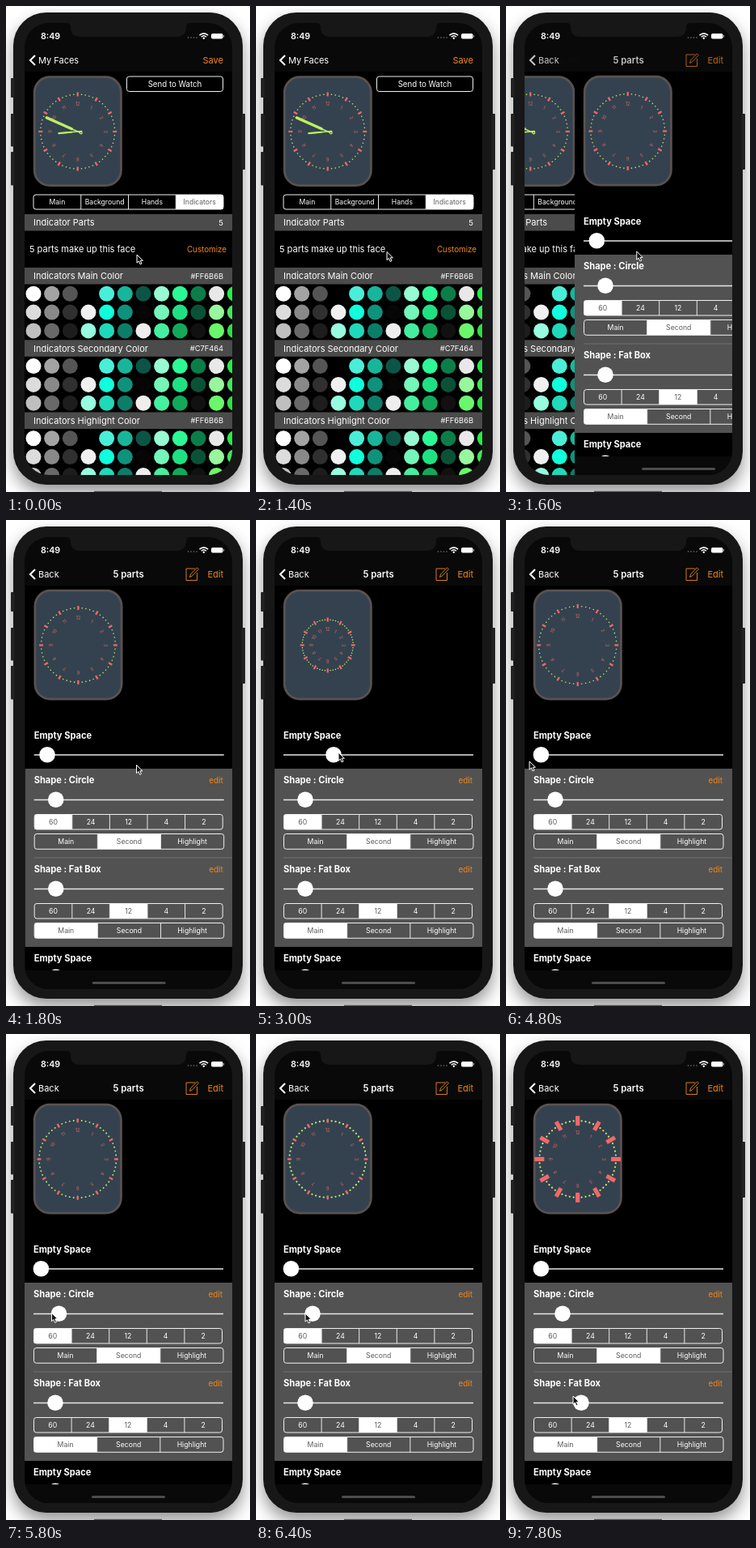
Animation, 302 px wide and 600 px high, one loop 8000 ms. Source, as an HTML page:

```html
<!DOCTYPE html>
<html lang="en">
<head>
<meta charset="utf-8">
<title>Watch face editor</title>
<style>
  html, body { margin: 0; width: 100%; height: 100%; overflow: hidden; background: #fff; }
  .phone { position: absolute; left: 9.3px; top: 7.5px; width: 283.4px; height: 583.5px; border-radius: 41px;
    background: #171717; box-shadow: 0 10px 20px rgba(0, 0, 0, .42); }
  svg { position: absolute; left: 0; top: 0; display: block; }
  text { font-family: Inter, Roboto, "Liberation Sans", sans-serif; }
</style>
</head>
<body>
<div class="phone"></div>
<svg id="stage" width="302" height="600" viewBox="0 0 302 600"></svg>
<script>
const LOOP = 8000, STEP = 200;
const ORANGE = '#f0871d', RED = '#f26868', LIME = '#c2ee64', FACE = '#34424f', CHROME = '#090909';
const CX = 88.7, CY = 154.5;

const rect = (x, y, w, h, fill, extra = '') =>
  `<rect x="${x}" y="${y}" width="${w}" height="${h}" fill="${fill}" ${extra}/>`;
const circle = (x, y, r, fill) => `<circle cx="${x}" cy="${y}" r="${r}" fill="${fill}"/>`;
const line = (d, stroke, width, extra = '') =>
  `<path d="${d}" fill="none" stroke="${stroke}" stroke-width="${width}" ${extra}/>`;

// y is the vertical middle of the capitals
function label(str, x, y, size, { fill = '#fff', anchor = 'start', weight = 400 } = {}) {
  return `<text x="${x}" y="${y + size * 0.365}" font-size="${size}" fill="${fill}" ` +
    `text-anchor="${anchor}" font-weight="${weight}">${str}</text>`;
}

function segments(x, y, w, h, names, chosen, size) {
  const cell = w / names.length;
  let out = rect(x + chosen * cell, y, cell, h, '#fff', 'rx="1.5"');
  names.forEach((name, i) => {
    if (i) out += line(`M${x + i * cell} ${y}v${h}`, '#e8e8e8', 1);
    out += label(name, x + (i + 0.5) * cell, y + h / 2, size,
      { anchor: 'middle', fill: i === chosen ? '#5c5c5c' : '#fff' });
  });
  return out + rect(x, y, w, h, 'none', 'rx="3" stroke="#f0f0f0"');
}

function ring(R, dot, grow) {
  let out = '';
  for (let i = 0; i < 60; i++) {
    const a = i * Math.PI / 30;
    out += circle(CX + R * Math.sin(a), CY - R * Math.cos(a), dot, LIME);
  }
  const w = 2.2 + 3 * grow, h = 5 + 7 * grow, inner = R - 12 - 3 * grow;
  for (let i = 1; i <= 12; i++) {
    out += `<g transform="translate(${CX} ${CY}) rotate(${i * 30})">` +
      label(i, 0, -inner, 5.8, { fill: '#b9645c', anchor: 'middle', weight: 500 }) +
      rect(-w / 2, -R - h / 2, w, h, RED) + '</g>';
  }
  return out;
}

const plate = rect(35.2, 87.2, 107.2, 134, FACE, 'rx="19" stroke="#5a5150" stroke-width="2.8"');

function hand(angle, length, width) {
  return `<g transform="translate(${CX} ${CY}) rotate(${angle})">` +
    line(`M0 5V-${length}`, '#bdee62', 1.5, 'stroke-linecap="round"') +
    line(`M0 -8V-${length - 1}`, '#bdee62', width, 'stroke-linecap="round"') + '</g>';
}

function navBar(back, middle, right) {
  return line('M36 61L30 67L36 73', '#fff', 2.1) + label(back, 40, 67, 11) + middle +
    label(right, 269, 67, 11, { fill: ORANGE, anchor: 'end' });
}

const swatches = [
  '#fff #a3a3a3 #555 #000 #4aeed8 #17b69b #0b5547 #97fad2 #2cf996 #0b7d49 #e8e8e8 #25ee48',
  '#dcdcdc #898989 #303030 #f0f0f0 #10ffdc #0f927c #060606 #73f6b7 #1fe184 #0a5236 #98f79c #42e85a',
  '#bfbfbf #696969 #1d1d1d #97fbe0 #1fd9ba #0c7d69 #eee #45efa0 #12a95b #111 #6bf76b #2ee040'
].map(row => row.split(' '));

function bar(y, title, value, size) {
  return rect(23, y, 257, 20.5, '#4b4b4b') + label(title, 34, y + 10.3, 11) +
    label(value, 269, y + 10.3, size, { anchor: 'end' });
}

function palette(y, title, value) {
  return bar(y, title, value, 9.3) + swatches.map((row, j) =>
    row.map((c, i) => circle(34 + i * 22.66, y + 32.3 + j * 22.8, 9.5, c)).join('')).join('');
}

const facePage = rect(23, 81, 257, 498, '#000') +
  `<g transform="translate(0 .5)">${plate}${ring(46, 0.8, 0)}` +
  `${hand(264.5, 24, 2.2)}${hand(294, 43, 3.4)}${circle(92.8, 156, 1.9, '#bdee62')}${circle(92.8, 156, 0.7, FACE)}</g>` +
  rect(149.5, 87, 119, 18.5, 'none', 'rx="3" stroke="#f0f0f0"') +
  label('Send to Watch', 209, 96.3, 9.7, { anchor: 'middle' }) +
  segments(34, 233, 235, 18, ['Main', 'Background', 'Hands', 'Indicators'], 3, 8.6) +
  bar(257, 'Indicator Parts', '5', 9.5) +
  label('5 parts make up this face', 29, 300, 11) +
  label('Customize', 273, 300, 9.8, { fill: ORANGE, anchor: 'end' }) +
  palette(323, 'Indicators Main Color', '#FF6B6B') +
  palette(412.3, 'Indicators Secondary Color', '#C7F464') +
  palette(501.5, 'Indicators Highlight Color', '#FF6B6B');

const track = y => line(`M34 ${y}H269`, '#e6e6e6', 1.5);
const bold = (str, y) => label(str, 34, y, 11.1, { weight: 650 });

function shapePart(y, name, count, tint) {
  return bold('Shape : ' + name, y) + label('edit', 268, y, 9.9, { fill: ORANGE, anchor: 'end' }) +
    track(y + 24.5) +
    segments(34.5, y + 42.5, 233, 18.5, ['60', '24', '12', '4', '2'], count, 8.7) +
    segments(34.5, y + 66.5, 234.5, 18.8, ['Main', 'Second', 'Highlight'], tint, 8.7);
}

const partsPage = rect(23, 81, 257, 498, '#000') + plate + '<g id="ring"></g>' +
  bold('Empty Space', 266) + track(290) +
  rect(23, 307, 257, 220, '#525252') + line('M34 417H280', '#707070', 1) +
  shapePart(321, 'Circle', 0, 1) + shapePart(431, 'Fat Box', 2, 0) +
  bold('Empty Space', 541) +
  '<g clip-path="url(#list)">' + circle(61, 564.3, 9.8, '#fff') + '</g>' +
  rect(23, 556, 257, 23, CHROME) +
  [289.8, 345.3, 455.3].map(y => `<circle class="knob" cy="${y}" r="9.8" fill="#fff"/>`).join('') +
  rect(106, 570, 91, 3, '#4c4c4c', 'rx="1.5"');

const pencil = line('M234 60H223V74.5H236.5V65', ORANGE, 0.9) +
  line('M227.5 70.5L228.5 67L236.5 58.8L238.4 60.7L230.5 69Z', ORANGE, 0.9);

const statusBar = label('8:49', 43, 37.3, 10.7, { weight: 600 }) +
  [225.5, 229, 232.5, 236].map(x => circle(x, 39, 0.8, '#777')).join('') +
  line('M239.5 36.2Q244.8 31.4 250.1 36.2', '#fff', 1.6) +
  line('M241.7 38.2Q244.8 35.4 247.9 38.2', '#fff', 1.5) + circle(244.8, 39.8, 1.2, '#fff') +
  rect(254, 34, 14.5, 6.6, '#fff', 'rx="1.8"') + rect(269, 36, 1.1, 2.6, '#999', 'rx=".5"');

const stage = document.getElementById('stage');
stage.innerHTML =
  '<defs><clipPath id="screen"><rect x="23" y="21" width="257" height="558" rx="30"/></clipPath>' +
  '<clipPath id="list"><rect x="23" y="527" width="257" height="29"/></clipPath></defs>' +
  rect(6, 89, 4.5, 24, '#222', 'rx="1"') + rect(6, 133, 4.5, 40.5, '#222', 'rx="1"') +
  rect(6, 180, 4.5, 41.5, '#222', 'rx="1"') + rect(291.5, 133, 4.5, 69, '#222', 'rx="1"') +
  rect(109, 598.8, 84, 2, '#555') +
  '<g clip-path="url(#screen)">' + rect(23, 21, 257, 558, CHROME) +
  `<g id="face">${facePage}</g><g id="parts">${partsPage}</g>` +
  `<g id="faceNav">${navBar('My Faces', '', 'Save')}</g><g id="partsNav">` +
  navBar('Back', label('5 parts', 151.5, 67, 11.3, { anchor: 'middle', weight: 600 }) + pencil, 'Edit') + '</g>' +
  statusBar +
  '<path d="M75 21Q80 21 80 26Q80 38 92 38H211Q223 38 223 26Q223 21 228 21Z" fill="#171717"/></g>' +
  '<path id="cursor" d="M0 0V10.2L2.4 8L4.1 11.9L6 11.1L4.3 7.3H7.4Z" fill="#111" stroke="#fff" stroke-width="1"/>';

const [face, parts, faceNav, partsNav, ringBox, cursor] =
  ['face', 'parts', 'faceNav', 'partsNav', 'ring', 'cursor'].map(id => document.getElementById(id));
const knobs = [...document.querySelectorAll('.knob')];

// [time, value, ...] rows, linear in between
const cursorPath = [
  [0, 162, 307], [400, 162, 307], [600, 162, 303.5], [1400, 162, 303.5], [1800, 161.5, 302.5], [2000, 152, 301],
  [2400, 57, 288], [2600, 64, 287.5], [3000, 102, 287], [3200, 106, 287], [3400, 102, 287],
  [4200, 49, 291], [4400, 38, 294], [4800, 29, 298], [5000, 34, 312], [5400, 52, 344],
  [6200, 61, 345], [6400, 61, 345], [6800, 51, 440], [7000, 51, 447], [7600, 81, 447], [7800, 83, 447]
];
const space = [[0, 50.3], [2400, 50.3], [2600, 58], [3000, 96], [3200, 100], [3400, 96], [4200, 43.7], [4400, 43.4]];
const dotSize = [[0, 61], [5400, 61], [6200, 70]];
const boxSize = [[0, 61], [7000, 61], [7600, 91], [7800, 93]];
const push = [[0, 257], [1400, 257], [1600, 62], [1800, 0.7], [2000, 0]];

function at(table, t) {
  const i = table.findIndex(row => row[0] > t);
  if (i < 0) return table[table.length - 1].slice(1);
  const a = table[i - 1], b = table[i], k = (t - a[0]) / (b[0] - a[0]);
  return a.slice(1).map((v, j) => v + (b[j + 1] - v) * k);
}

function draw(t) {
  const [shift] = at(push, t), shown = 1 - shift / 257;
  face.setAttribute('transform', `translate(${-77 * shown} 0)`);
  face.setAttribute('visibility', shown > 0.99 ? 'hidden' : 'visible');
  parts.setAttribute('transform', `translate(${shift} 0)`);
  faceNav.setAttribute('opacity', Math.max(0, 1 - shown * 1.3));
  partsNav.setAttribute('opacity', shown);

  const values = [space, dotSize, boxSize].map(table => at(table, t)[0]);
  knobs.forEach((knob, i) => knob.setAttribute('cx', values[i]));
  const [gap, dot, box] = values;
  ringBox.innerHTML = ring(48.2 - (gap - 43) * 0.315 - (dot - 61) * 0.08,
    0.78 + (dot - 61) * 0.038, (box - 61) / 32);
  cursor.setAttribute('transform', `translate(${at(cursorPath, t).join(' ')})`);
}

let last = -1;
function tick() {
  const t = Math.floor(performance.now() % LOOP / STEP) * STEP;
  if (t !== last) draw(last = t);
  requestAnimationFrame(tick);
}
tick();
</script>
</body>
</html>
```
